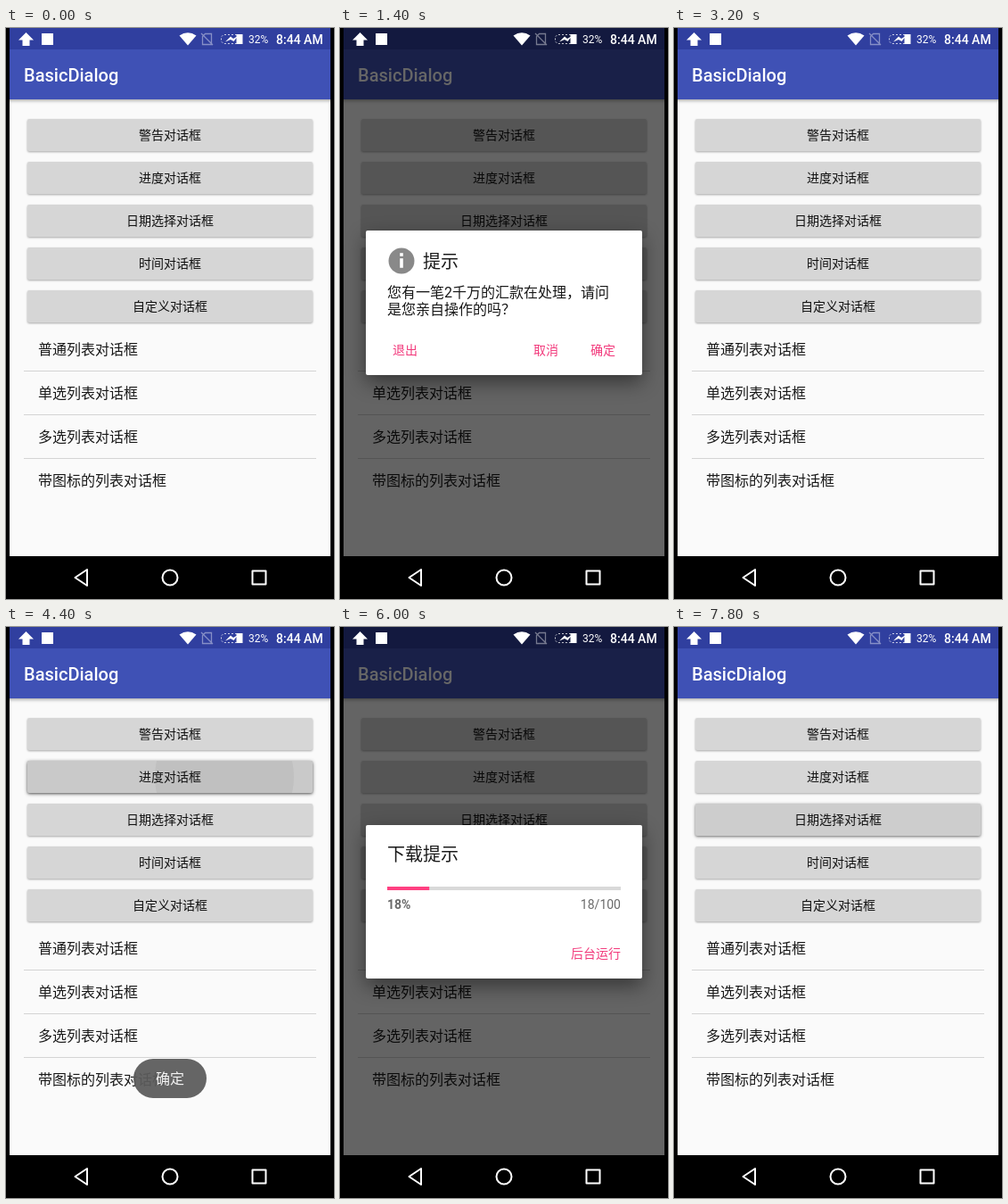
These frames come from a looping animation (368x640 px, 8 s). An HTML page:

```html
<!DOCTYPE html>
<html lang="zh-CN">
<head>
<meta charset="utf-8">
<title>BasicDialog</title>
<style>
  @property --percent { syntax: '<integer>'; inherits: true; initial-value: 0; }

  html, body { margin: 0; width: 100%; height: 100%; overflow: hidden; background: #000; }
  svg { display: block; width: 100%; height: 100%; }
  text, .counter { font-family: Roboto, "Noto Sans CJK SC", "Noto Sans CJK", sans-serif; }

  .title { font-size: 20px; font-weight: 500; fill: #fff; }
  .bar { fill: #3f51b5; filter: drop-shadow(0 1px 2px #0006); }
  .button { fill: #d6d6d6; filter: drop-shadow(0 1px 1px #0005); }
  .label { font-size: 14px; font-weight: 500; text-anchor: middle; fill: #111; }
  .item { font-size: 16px; fill: #181818; }
  .card { fill: #fff; filter: drop-shadow(0 8px 11px #0007); }
  .heading { font-size: 20px; fill: #1a1a1a; }
  .action { font-size: 14px; font-weight: 500; fill: #f23a7c; }
  .counter { display: flex; justify-content: space-between; font-size: 14px; line-height: 18px; color: #6b6b6b; }
  .counter::before { counter-reset: n var(--percent); content: counter(n) "%"; font-weight: 700; }
  .counter::after { counter-reset: n var(--percent); content: counter(n) "/100"; }
  .fill { fill: #ff4081; height: 4px; width: calc(var(--percent) * 2.62px); }

  .raised { fill: #c9c9c9; filter: drop-shadow(0 1px 2px #0007); }
  .ripple { fill: #0000000c; }
  .touch { fill: #0000001a; }

  .anim { opacity: 0; animation: 8s step-end infinite; }
  .dialog { transform-box: fill-box; transform-origin: center; }
  .press1 { animation-name: press1; }
  .press2 { animation-name: press2; }
  .press3 { animation-name: press3; }
  .dim { animation-name: dim; }
  .alert { animation-name: alert; }
  .confirm { animation-name: confirm; }
  .download { animation-name: download, count; }
  .hide { animation-name: hide; }
  .toast { animation-name: toast; }

  /* 2.5% of the loop is one 200 ms step */
  @keyframes press1 { 0% { opacity: 0 } 10% { opacity: 1 } 12.5% { opacity: .6 } 15%, 100% { opacity: 0 } }
  @keyframes press2 { 0% { opacity: 0 } 55% { opacity: 1 } 57.5% { opacity: .6 } 60%, 100% { opacity: 0 } }
  @keyframes press3 { 0% { opacity: 0 } 97.5%, 100% { opacity: .65 } }
  @keyframes dim {
    0% { opacity: 0 } 12.5% { opacity: .6 } 15% { opacity: 1 }
    37.5% { opacity: .4 } 40% { opacity: 0 }
    57.5% { opacity: .6 } 60% { opacity: 1 } 80%, 100% { opacity: 0 }
  }
  @keyframes alert {
    0% { opacity: 0; transform: scale(.96) } 12.5% { opacity: .7; transform: scale(.97) }
    15% { opacity: 1; transform: none } 37.5% { opacity: .4; transform: none }
    40%, 100% { opacity: 0; transform: none }
  }
  @keyframes confirm { 0% { opacity: 0 } 35% { opacity: 1 } 40%, 100% { opacity: 0 } }
  @keyframes download {
    0% { opacity: 0; transform: scale(.96) } 57.5% { opacity: .7; transform: scale(.97) }
    60% { opacity: 1; transform: none } 80%, 100% { opacity: 0; transform: none }
  }
  @keyframes count {
    0% { --percent: 0 }
    57.5% { --percent: 0; animation-timing-function: steps(7) }
    75% { --percent: 18 }
    77.5%, 100% { --percent: 20 }
  }
  @keyframes hide { 0% { opacity: 0 } 77.5% { opacity: 1 } 80%, 100% { opacity: 0 } }
  @keyframes toast {
    0% { opacity: 0 } 42.5% { opacity: .4 } 45% { opacity: .9 } 47.5% { opacity: 1 }
    70% { opacity: .5 } 72.5%, 100% { opacity: 0 }
  }
</style>
</head>
<body>
<svg viewBox="0 0 368 640">
  <defs>
    <rect id="face" width="320" height="36" rx="2"/>
    <clipPath id="faceClip"><use href="#face"/></clipPath>
    <clipPath id="screen"><rect x="4" width="360" height="592"/></clipPath>
  </defs>

  <g clip-path="url(#screen)">
    <rect x="4" width="360" height="592" fill="#fafafa"/>
    <rect class="bar" x="0" width="368" height="80"/>
    <rect x="4" width="360" height="24" fill="#303f9f"/>
    <text class="title" x="20" y="60">BasicDialog</text>

    <g class="button">
      <use href="#face" x="24" y="102"/>
      <use href="#face" x="24" y="150"/>
      <use href="#face" x="24" y="198"/>
      <use href="#face" x="24" y="246"/>
      <use href="#face" x="24" y="294"/>
    </g>
    <g class="anim press1" transform="translate(24 102)">
      <use href="#face" class="raised"/>
      <g clip-path="url(#faceClip)"><circle class="ripple" cx="221" cy="18" r="78"/></g>
    </g>
    <g class="anim press2" transform="translate(24 150)">
      <use href="#face" class="raised"/>
      <g clip-path="url(#faceClip)"><circle class="ripple" cx="221" cy="18" r="78"/></g>
    </g>
    <g class="anim press3" transform="translate(24 198)">
      <use href="#face" class="raised"/>
    </g>
    <g class="label">
      <text x="184" y="125">警告对话框</text>
      <text x="184" y="173">进度对话框</text>
      <text x="184" y="221">日期选择对话框</text>
      <text x="184" y="269">时间对话框</text>
      <text x="184" y="317">自定义对话框</text>
    </g>

    <g class="item">
      <text x="36" y="366">普通列表对话框</text>
      <text x="36" y="415">单选列表对话框</text>
      <text x="36" y="464">多选列表对话框</text>
      <text x="36" y="513">带图标的列表对话框</text>
    </g>
    <path d="M20 384.5h328M20 433.5h328M20 482.5h328" stroke="#d4d4d4"/>

    <rect class="anim dim" x="4" width="360" height="592" fill="#0009"/>

    <g class="anim dialog alert">
      <rect class="card" x="29" y="227" width="310" height="162" rx="2"/>
      <circle cx="69" cy="261" r="14.5" fill="#898989"/>
      <path d="M67.5 252.5h3v3h-3zM67.5 258.5h3v10h-3z" fill="#fff" stroke="#fff" stroke-width=".6"/>
      <text class="heading" x="93" y="269">提示</text>
      <text class="item" x="53" y="302">您有一笔2千万的汇款在处理，请问</text>
      <text class="item" x="53" y="321">是您亲自操作的吗？</text>
      <rect class="anim confirm touch" x="267" y="343" width="56" height="36" rx="2"/>
      <g class="action">
        <text x="59" y="366">退出</text>
        <text x="217" y="366">取消</text>
        <text x="281" y="366">确定</text>
      </g>
    </g>

    <g class="anim dialog download">
      <rect class="card" x="29" y="222" width="310" height="172" rx="2"/>
      <text class="heading" x="53" y="262">下载提示</text>
      <rect x="53" y="291" width="262" height="4" fill="#d9d9d9"/>
      <rect class="fill" x="53" y="291"/>
      <foreignObject x="53" y="302" width="262" height="20"><div class="counter"></div></foreignObject>
      <rect class="anim hide touch" x="251" y="348" width="72" height="36" rx="2"/>
      <text class="action" x="259" y="371">后台运行</text>
    </g>
  </g>

  <!-- status bar -->
  <g fill="#fff">
    <path d="M22.5 5L31 13.5h-4.500V20h-8v-6.500H14z"/>
    <rect x="40" y="6" width="13" height="13"/>
    <path d="M194.500 8.500Q204 2 213.500 8.500L204 19.500z"/>
    <path d="M223.500 6.500h7v12h-10v-9zM219 6l13 13" fill="none" stroke="#fff" stroke-opacity=".42" stroke-width="1.300"/>
    <path d="M259 7.500H244L241.500 10v5l2.500 2.500h15" fill="none" stroke="#fff" stroke-opacity=".75" stroke-dasharray="2 2"/>
    <path d="M258.500 7h7v11h-7zM246 15.500l6-6 3 2.500 5-3-4.500 6-3.500-2z"/>
    <text x="272" y="17" font-size="12">32%</text>
    <text x="303" y="18" font-size="14" font-weight="500">8:44 AM</text>
  </g>

  <g class="anim toast">
    <rect x="143" y="484" width="82" height="44" rx="22" fill="#5c5c5c" fill-opacity=".94"/>
    <text x="168" y="512" font-size="16" fill="#f4f4f4">确定</text>
  </g>

  <!-- navigation bar -->
  <g fill="none" stroke="#fff" stroke-width="2" stroke-linejoin="round">
    <path d="M91 607v18L77.500 616z"/>
    <circle cx="184" cy="616" r="8.500"/>
    <rect x="276.500" y="608.500" width="15" height="15"/>
  </g>
</svg>
</body>
</html>
```
